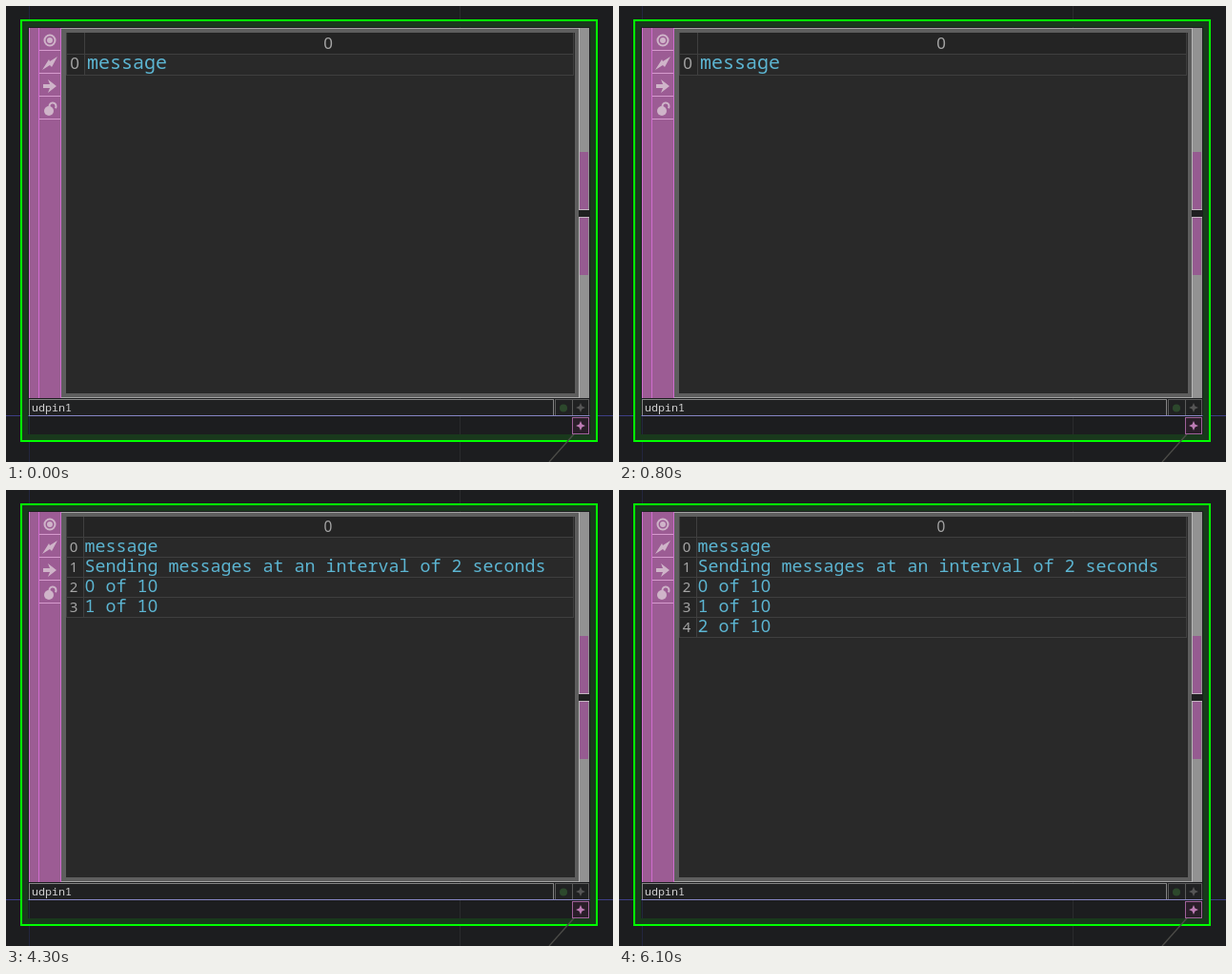
An HTML page with a canvas that plays this animation: 637x478 px, repeating every 8 s.

```html
<!DOCTYPE html>
<html>
<head>
<meta charset="utf-8">
<style>
  html, body { margin: 0; width: 100%; height: 100%; overflow: hidden; background: #1c1d1f; }
  canvas { display: block; }
</style>
</head>
<body>
<canvas id="stage" width="637" height="478"></canvas>
<script>
const ctx = document.getElementById('stage').getContext('2d');
const LOOP = 8000;
const MONO = '"Noto Sans Mono", monospace';
const SANS = '"Noto Sans", sans-serif';
const LINES = ['message', 'Sending messages at an interval of 2 seconds', '0 of 10', '1 of 10', '2 of 10'];
const ICON = '#cfb4c9';

function rect(x, y, w, h, color) {
  ctx.fillStyle = color;
  ctx.fillRect(x, y, w, h);
}

function frame(x, y, w, h, color, width = 1) {
  ctx.strokeStyle = color;
  ctx.lineWidth = width;
  ctx.strokeRect(x + width / 2, y + width / 2, w - width, h - width);
}

function poly(points, color) {
  ctx.fillStyle = color;
  ctx.beginPath();
  points.forEach(([x, y]) => ctx.lineTo(x, y));
  ctx.fill();
}

function disc(x, y, r, color) {
  ctx.fillStyle = color;
  ctx.beginPath();
  ctx.arc(x, y, r, 0, Math.PI * 2);
  ctx.fill();
}

function ring(x, y, r, width, color, from = 0, to = Math.PI * 2) {
  ctx.strokeStyle = color;
  ctx.lineWidth = width;
  ctx.beginPath();
  ctx.arc(x, y, r, from, to);
  ctx.stroke();
}

function sparkle(x, y, color) {
  poly([[x, y - 5], [x + 1.5, y - 1.5], [x + 5, y], [x + 1.5, y + 1.5],
        [x, y + 5], [x - 1.5, y + 1.5], [x - 5, y], [x - 1.5, y - 1.5]], color);
}

// Fixed-pitch text with plain, unslashed zeros.
function monoText(text, x, y, size, pitch, color) {
  ctx.fillStyle = color;
  ctx.textAlign = 'center';
  [...text].forEach((char, i) => {
    ctx.font = `${size}px ${char === '0' ? SANS : MONO}`;
    ctx.fillText(char, x + (i + 0.5) * pitch, y);
  });
}

function label(text, x, y, size, color = '#a5a5a5') {
  ctx.font = `500 ${size}px ${SANS}`;
  ctx.textAlign = 'center';
  ctx.fillStyle = color;
  ctx.fillText(text, x, y);
}

function drawBackdrop() {
  rect(0, 0, 637, 478, '#1c1d1f');
  rect(24, 0, 1, 478, '#23263f');
  rect(476, 0, 1, 478, '#2a2b2d');
  rect(0, 429, 637, 1, '#3d3f85');
}

function drawGlow(mode) {
  const band = { rest: '#19391c', fade: '#35452f', flash: '#477347' }[mode];
  const bottom = mode === 'fade' ? '#19391c' : band;
  frame(17, 16, 602, 439, band, 6);
  rect(17, 438, 6, 17, bottom);
  rect(613, 438, 6, 17, bottom);
  rect(17, 450, 602, 5, bottom);
  frame(15, 14, 606, 443, mode === 'flash' ? '#3cf83c' : '#00ff00', 2);
}

function drawConnector() {
  ctx.strokeStyle = '#4c4c48';
  ctx.lineWidth = 1.3;
  ctx.beginPath();
  ctx.moveTo(602, 442);
  ctx.lineTo(570, 478);
  ctx.stroke();
  rect(594, 431, 18, 18, '#2a1e29');
  frame(594, 431, 18, 18, '#9f619a');
  sparkle(603, 440, '#bd7cb5');
}

function drawSidebar(edge) {
  rect(24, 23, 34, 388, '#9c5c94');
  for (const x of [24, 34, 57]) rect(x, 23, 1, 388, edge);
  for (const y of [47, 71, 95, 119]) rect(35, y - 1, 22, 1, '#d69bce');

  ring(46, 36, 5.5, 2, ICON);
  disc(46, 36, 3, ICON);
  poly([[54, 53], [46, 58], [45, 56], [38, 67], [46, 62], [48, 64]], ICON);
  poly([[39, 82], [46, 82], [44, 77], [53, 84], [44, 91], [46, 86], [39, 86]], ICON);
  disc(45, 110, 5, ICON);
  ring(49, 105, 3.5, 2, ICON, Math.PI * 0.9, Math.PI * 2.2);
}

function drawScrollbar() {
  rect(601, 23, 11, 388, '#929292');
  rect(601, 23, 1, 388, '#b5b5b5');
  for (const y of [153, 222]) rect(602, y, 9, 60, '#965b91');
  rect(601, 214, 11, 7, '#1e1f20');
  rect(601, 213, 11, 1, '#c5b5c3');
  rect(601, 221, 11, 1, '#c5b5c3');
}

function drawTable(rows) {
  const big = rows === 1;
  const height = big ? 22 : 21;
  const top = big ? 50 : 49;
  const split = big ? 82 : 81;
  const bottom = top + rows * height;
  const grid = '#3f3f3f';

  rect(58, 23, 543, 388, '#5e5e5e');
  rect(58, 23, 543, 1, '#a2a2a2');
  rect(58, 410, 543, 1, '#a2a2a2');
  rect(63, 28, 534, 378, '#292929');
  rect(63, 28, 533, top - 28, '#242424');
  rect(63, top, split - 63, bottom - top, '#252525');

  for (let y = top; y <= bottom; y += height) rect(63, y, 533, 1, grid);
  rect(split, 28, 1, bottom - 28, grid);
  rect(63, 28, 1, bottom - 28, grid);
  rect(595, 28, 1, bottom - 28, grid);

  label('0', 338, big ? 45 : 44, big ? 17 : 15.5);
  for (let i = 0; i < rows; i++) {
    const base = top + 16 + i * height;
    label(i, big ? 72 : 71, base - (big ? 0 : 0.5), big ? 17 : 15);
    monoText(LINES[i], big ? 85 : 82.5, base, big ? 20 : 18.33, big ? 12 : 11, '#5cb5d2');
  }
}

function drawNameBar(fade) {
  rect(24, 412, 588, 18, '#202122');
  frame(24, 412, 551, 18, '#858585');
  frame(576, 412, 19, 18, '#5b5b5b');
  frame(594, 412, 18, 18, '#5b5b5b');
  if (!fade) rect(24, 429, 588, 1, '#8585c4');
  monoText('udpin1', 27, 425, 11.67, 7, '#d2d2d2');
  disc(585, 421.5, 4, '#2c482c');
  sparkle(603, 421, '#555555');
}

function draw(t) {
  const flash = (t >= 100 && t < 600) || (t >= 5200 && t < 5400);
  const fade = t >= 600 && t < 800;
  const rows = t < 2500 ? 1 : t < 4300 ? 3 : t < 6100 ? 4 : 5;

  drawBackdrop();
  drawGlow(flash ? 'flash' : fade ? 'fade' : 'rest');
  drawConnector();
  if (fade) rect(23, 22, 590, 416, '#2e2f2e');
  drawSidebar(fade ? '#e0a3c8' : '#cf6dce');
  drawTable(rows);
  drawScrollbar();
  if (fade) rect(601, 214, 11, 7, '#2e2f2e');
  drawNameBar(fade);
}

function tick(now) {
  draw(now % LOOP);
  requestAnimationFrame(tick);
}
requestAnimationFrame(tick);
</script>
</body>
</html>
```
